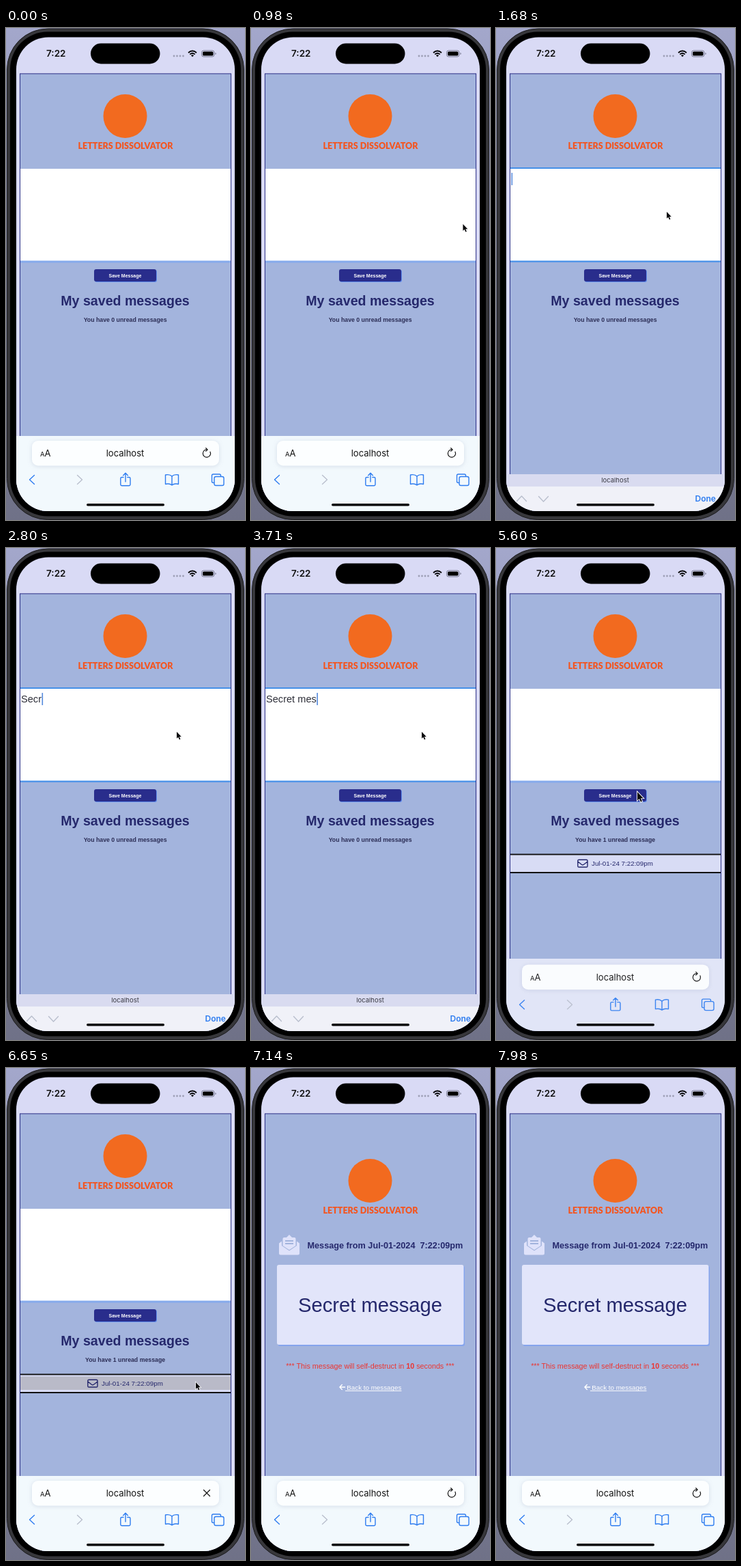
Recreate the animation shown at these times as an HTML page. Size 350 px wide and 720 px high, loop 8 s.

```html
<!DOCTYPE html>
<html lang="en">
<head>
<meta charset="utf-8">
<title>Saved messages</title>
<style>
  html, body { margin: 0; width: 100%; height: 100%; overflow: hidden; background: #9da1c4; }
  svg { display: block; width: 100%; height: 100%; }
  text { font-family: "Liberation Sans", Arial, sans-serif; white-space: pre; fill: #25286c; }
  .mid { text-anchor: middle; }
  .bold { font-weight: 700; }
  .ui { font-family: Inter, sans-serif; fill: #111; }
  .line { fill: none; stroke-width: 1.4; stroke-linecap: round; stroke-linejoin: round; }
  .blue { stroke: #2f7df0; }
  .gray { stroke: #b9bfcd; }
  .dark { stroke: #111; }
</style>
</head>
<body>
<svg viewBox="0 0 350 720">
  <defs>
    <clipPath id="screenClip"><rect x="15" y="13.5" width="320" height="693.5" rx="47"/></clipPath>
    <linearGradient id="backdrop" x2="0" y2="1">
      <stop offset="0" stop-color="#a3a7cb"/><stop offset="1" stop-color="#6f7187"/>
    </linearGradient>
    <filter id="soft" x="-10%" y="-30%" width="120%" height="170%">
      <feDropShadow dx="0" dy="1" stdDeviation="3" flood-color="#8d9ab8" flood-opacity=".3"/>
    </filter>
  </defs>

  <!-- Phone body -->
  <rect width="350" height="720" fill="url(#backdrop)"/>
  <rect x="1.5" y="1" width="347" height="718.5" rx="60" fill="#37373b" stroke="#19191b"/>
  <rect x="6" y="5.5" width="338" height="709" rx="55" fill="#000"/>

  <g clip-path="url(#screenClip)">
    <rect x="15" y="13" width="320" height="694" fill="#d9daf5"/>
    <rect x="20.5" y="66.9" width="309" height="660" fill="#a3b4dd" stroke="#2b2f86"/>

    <!-- Status bar -->
    <text class="ui" x="59" y="42" font-size="13.5" font-weight="600">7:22</text>
    <rect x="124" y="22.5" width="101.5" height="30" rx="15" fill="#000"/>
    <g fill="#9d9fb5">
      <circle cx="246" cy="41" r="1.4"/><circle cx="250.5" cy="41" r="1.4"/>
      <circle cx="255" cy="41" r="1.4"/><circle cx="259.5" cy="41" r="1.4"/>
    </g>
    <path d="M267 36.2Q273 30.8 279 36.2M269.3 38.6Q273 35.3 276.7 38.6" fill="none" stroke="#000" stroke-width="1.9"/>
    <path d="M270.9 40Q273 38.3 275.1 40L273 42.2Z"/>
    <rect x="286.5" y="33" width="18.5" height="9" rx="2.8" fill="none" stroke="#777991"/>
    <rect x="288" y="34.5" width="15.5" height="6" rx="1.6"/>
    <path d="M306.5 36v3q1.2-.4 1.2-1.5t-1.2-1.5" fill="#777991"/>

    <g id="brand">
      <circle cx="174.5" cy="129" r="32" fill="#f26a1f"/>
      <text class="mid" x="175" y="177.3" font-size="12.5" style="font-family:Lato,sans-serif;font-weight:900;fill:#f4551f">LETTERS DISSOLVATOR</text>
    </g>

    <!-- Message list page -->
    <g id="home">
      <rect x="21" y="206" width="308" height="135" fill="#fff"/>
      <rect id="underline" x="21" y="340.5" width="308" height="3" fill="#86aaec"/>
      <g id="focusRing" fill="#4590e8">
        <rect x="21" y="204" width="308" height="2"/><rect x="21" y="340.5" width="308" height="2.2"/>
      </g>
      <text id="typed" x="22" y="226" font-size="14.6" style="fill:#2d2e38"></text>
      <rect id="caret" y="212" width="1.6" height="18" fill="#5288dc"/>

      <rect x="130" y="354" width="91" height="18" rx="3" fill="#5f8cec"/>
      <rect x="129" y="353" width="91" height="18" rx="3" fill="#292d8c"/>
      <text class="mid bold" x="174.5" y="364.8" font-size="7" style="fill:#fff">Save Message</text>
      <text class="mid bold" x="174.5" y="406" font-size="19.6">My saved messages</text>
      <text class="mid bold" id="count" x="174.6" y="430" font-size="8.75" style="fill:#2b2d55"></text>

      <g id="row">
        <rect x="21" y="447.5" width="308" height="28.5" fill="#111"/>
        <rect x="21" y="449.4" width="308" height="24.6" fill="#d8dcf5"/>
        <rect id="pressed" x="21" y="451.5" width="308" height="19.5" fill="#b9bac8"/>
        <path d="M121.4 456.2h11q1.6 0 1.6 1.6v7.6q0 1.6-1.6 1.6h-11q-1.6 0-1.6-1.6v-7.6q0-1.6 1.6-1.6zM120 459l5.4 4.2q1.5 1.1 3 0L134 459" fill="none" stroke="#25286c" stroke-width="1.4"/>
        <text x="140" y="465.3" font-size="9.8">Jul-01-24 7:22:09pm</text>
      </g>
    </g>

    <!-- Opened message page -->
    <g id="message">
      <g fill="#dfe2fa">
        <path d="M41 256.5l4-3v6.5l11 7.5 11-7.5v-6.5l4 3v14.5q0 2.5-2.5 2.5h-25q-2.5 0-2.5-2.5z"/>
        <path d="M46.5 260v-10q0-2 2-2h3.5l4-4 4 4h3.5q2 0 2 2v10l-9.5 6.2z"/>
        <path d="M50 253h12M50 257h12" stroke="#a3b4dd" stroke-width="1.8"/>
      </g>
      <text class="bold" x="82.5" y="263.5" font-size="12.7">Message from Jul-01-2024  7:22:09pm</text>
      <rect x="39.5" y="289.5" width="273.5" height="117.5" rx="3" fill="#85a4ed"/>
      <rect x="38" y="288" width="273.5" height="117" rx="3" fill="#e2e5fa"/>
      <text class="mid" x="174.5" y="356.5" font-size="29.2">Secret message</text>
      <text class="mid" x="174.5" y="440" font-size="10.75" style="fill:#ec3430">*** This message will self-destruct in <tspan class="bold">10</tspan> seconds ***</text>
      <path class="line" d="M137.5 467h-7.5m3.3-3.4-3.4 3.4 3.4 3.4" stroke="#fff"/>
      <text x="140.3" y="471" font-size="9.8" style="fill:#fff">Back to messages</text>
      <rect x="138" y="472" width="82.5" height=".9" fill="#fff"/>
    </g>

    <!-- Browser bar -->
    <rect id="barBase" x="15" width="320" height="130" fill="#e1e5f7"/>
    <rect id="barTint" x="15" width="320" height="130" fill="#f2f9fd"/>
    <g id="address">
      <rect x="38" y="604" width="274" height="36.5" rx="9" fill="#fcfeff" filter="url(#soft)"/>
      <text class="ui" x="50" y="627" font-size="9.5">A</text>
      <text class="ui" x="56.5" y="627" font-size="13">A</text>
      <text class="ui mid" x="174.5" y="627" font-size="13">localhost</text>
      <path id="reload" class="line dark" d="M299 620.2a5.6 5.6 0 1 1-4.5-3.2m-1.8-2.3 2.5 2.4-2.6 2.3" style="stroke-width:1.2"/>
      <path id="stop" class="line dark" d="M289.5 617.5l9 9m0-9l-9 9" style="stroke-width:1.2"/>
    </g>
    <g id="tools" class="line blue">
      <path d="M41.5 654.5l-7 6.5 7 6.5"/>
      <path class="gray" d="M104.5 654.5l7 6.5-7 6.5"/>
      <path d="M172 657.5h-2.5q-1.7 0-1.7 1.7v8.8q0 1.7 1.7 1.7h10.8q1.7 0 1.7-1.7v-8.8q0-1.7-1.7-1.7h-2.5M175 664v-12.5m-3.4 3.2 3.4-3.4 3.4 3.4"/>
      <path d="M243 656q-3.5-3.4-9.5-2v13.5q6-1.4 9.5 1.5 3.5-2.9 9.5-1.5v-13.5q-6-1.4-9.5 2v13"/>
      <path d="M304.5 665.5h-1q-2 0-2-2v-8.5q0-2 2-2h9q2 0 2 2v1"/>
      <rect x="305" y="656.5" width="14" height="13" rx="2.3"/>
    </g>

    <!-- Keyboard accessory -->
    <g id="accessory">
      <rect x="15" y="653" width="320" height="18" fill="#d9dbf0"/>
      <text class="ui mid" x="174.5" y="665.2" font-size="9.5" style="fill:#3a3a44">localhost</text>
      <rect x="15" y="671" width="320" height="40" fill="#f0f1f8"/>
      <path class="line gray" d="M30.5 692.5l7-7.5 7 7.5M62.5 685.5l7 7.5 7-7.5"/>
      <text class="ui" x="291.5" y="693.3" font-size="12" font-weight="600" style="fill:#2f7df0">Done</text>
    </g>
    <rect x="118" y="696" width="114" height="3.6" rx="1.8"/>
  </g>

  <path id="cursor" d="M0 0V12.5L2.8 9.9 5 14.6 7 13.7 4.9 9.2H8.8Z" fill="#0a0a0c" stroke="#fff" stroke-width="1.8" paint-order="stroke"/>
</svg>

<script>
const LOOP = 8000;
const FOCUS = 1440, TYPE = 2200, KEY = 140, SAVE = 5250, OPEN = 6580, LOADED = 7140;
const PHRASE = "Secret message";
// Pointer stops: time, x, y, scale (larger over the button)
const STOPS = [
  [700, 354, 300, .78], [1330, 250, 269, .78], [4350, 250, 269, .78], [4620, 249, 300, .78],
  [5200, 207, 357, 1], [5700, 207, 357, 1], [6480, 278, 460, .78], [LOADED, 278, 460, .78]
];

const el = id => document.getElementById(id);
const clamp = v => Math.min(1, Math.max(0, v));
const easeOut = u => 1 - (1 - clamp(u)) ** 3;
const show = (id, on) => { el(id).style.display = on ? "" : "none"; };
const move = (id, x, y, size = 1) => el(id).setAttribute("transform", `translate(${x} ${y}) scale(${size})`);
const fade = (id, a) => el(id).setAttribute("opacity", a);

function pointerAt(t) {
  const i = STOPS.findIndex(s => s[0] > t);
  if (i < 1) return null;
  const [t0, ...from] = STOPS[i - 1], [t1, ...to] = STOPS[i];
  const u = (t - t0) / (t1 - t0), k = u * u * (3 - 2 * u);
  return from.map((v, n) => v + (to[n] - v) * k);
}

function drawPage(t) {
  const opened = t >= LOADED, saved = t >= SAVE;
  const focused = t >= FOCUS && !saved;
  show("home", !opened);
  show("message", opened);
  move("brand", 0, opened ? 36 : 0);
  show("focusRing", focused);
  show("underline", !focused);

  const letters = focused ? Math.min(PHRASE.length, Math.max(0, Math.floor((t - TYPE) / KEY))) : 0;
  el("typed").textContent = PHRASE.slice(0, letters);
  const lastKey = letters ? TYPE + letters * KEY : FOCUS;
  show("caret", focused && (t - lastKey) % 1000 < 500);
  if (!opened) el("caret").setAttribute("x", 22.5 + el("typed").getComputedTextLength());

  el("count").textContent = saved ? "You have 1 unread message" : "You have 0 unread messages";
  show("row", saved);
  show("pressed", t >= OPEN);
}

function drawBrowser(t) {
  // 0 = full browser bar, 1 = compact bar with keyboard accessory
  const compact = t < SAVE ? easeOut((t - FOCUS) / 240) : 1 - easeOut((t - SAVE) / 600);
  for (const id of ["barBase", "barTint"]) el(id).setAttribute("y", 597 + 56 * compact);
  fade("barTint", t < SAVE ? 1 - compact : clamp((t - 5650) / 250));
  move("address", 0, 80 * compact);
  move("tools", 0, 100 * compact);
  fade("address", 1 - compact);
  fade("tools", 1 - compact);
  // The accessory leaves sooner than the full bar arrives
  fade("accessory", t < SAVE ? compact : clamp(1 - (t - SAVE) / 250));
  const loading = t >= OPEN && t < LOADED;
  show("stop", loading);
  show("reload", !loading);
}

function draw(now) {
  const t = now % LOOP;
  drawPage(t);
  drawBrowser(t);
  const pointer = pointerAt(t);
  show("cursor", pointer);
  if (pointer) move("cursor", ...pointer);
}

const start = performance.now();
function tick() {
  draw(performance.now() - start);
  requestAnimationFrame(tick);
}
tick();
</script>
</body>
</html>
```
